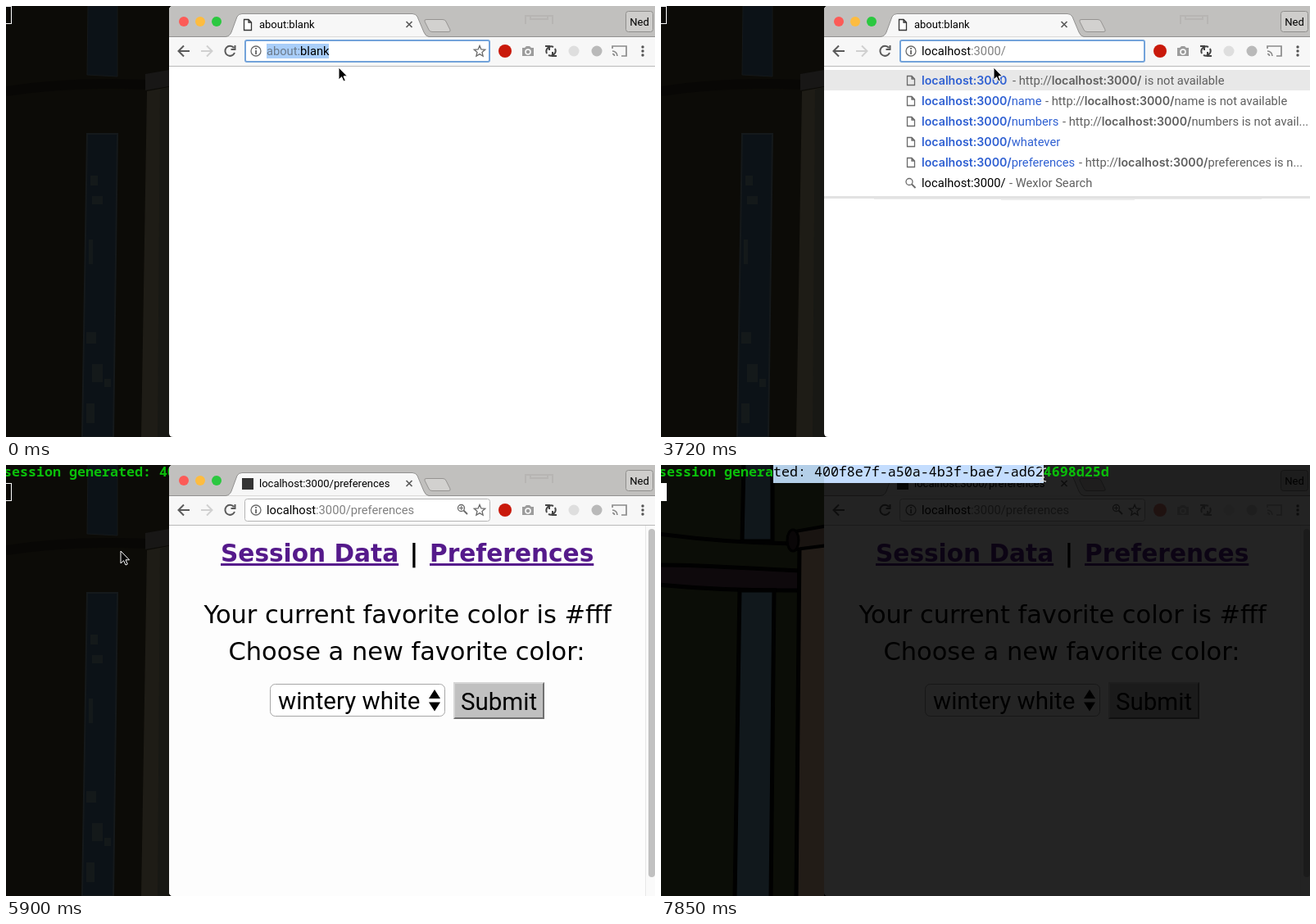
Write an HTML page that moves like this. It is 792x526 px and loops after 8000 ms.

```html
<!DOCTYPE html>
<html lang="en">
<head>
<meta charset="utf-8">
<title>Session demo</title>
<style>
  html, body { margin: 0; width: 100%; height: 100%; overflow: hidden; background: #0c0b07; }
  svg { display: block; width: 792px; height: 526px; }
  text { white-space: pre; font-family: Roboto, sans-serif; }
  .omni { font-size: 14.7px; }
  .strong { font: 600 14.2px Inter, sans-serif; }
  .tab { font-size: 13px; }
  .page { font: 30.45px "DejaVu Sans", sans-serif; text-anchor: middle; }
  .head { font: bold 29.6px "DejaVu Sans", sans-serif; }
  .link { text-decoration: underline; }
  .form { font-size: 29.5px; }
  .term { font: bold 16.67px "Noto Sans Mono", monospace; fill: #0abf0a; }
  #chosen { fill: #000; font-weight: 400; }
  .line { fill: none; stroke: #5a5a5a; stroke-width: 2; }
  .thin { fill: none; stroke: #6a6a6a; stroke-width: 1.3; }
</style>
</head>
<body>
<svg id="stage" viewBox="0 0 792 526"></svg>
<script>
const LOOP = 8000, ACTIVE = 6040;
const OUTPUT = 'session generated: 400f8e7f-a50a-4b3f-bae7-ad624698d25d';
const CELL = 10, TERM_X = -3, SEL_START = 14;

const rect = (x, y, w, h, fill, extra = '') =>
  `<rect x="${x}" y="${y}" width="${w}" height="${h}" fill="${fill}" ${extra}/>`;
const path = (d, attrs) => `<path d="${d}" ${attrs}/>`;
const text = (x, y, cls, body, fill = '#000') =>
  `<text x="${x}" y="${y}" class="${cls}" fill="${fill}">${body}</text>`;
const during = (from, to, body) => `<g data-from="${from}" data-to="${to}">${body}</g>`;
// Text between asterisks is bold.
const rich = s => s.split('*').map((part, i) =>
  i % 2 ? `<tspan class="strong">${part}</tspan>` : part).join('');

const sheet = (x, y, h, attrs = 'class="thin"') =>
  path(`M${x} ${y}h5.5l3.5 3.5v${h - 3.5}h-9zM${x + 5.5} ${y}v3.5h3.5`, attrs);
const star = (x, y, r) => {
  const points = Array.from({ length: 10 }, (_, i) => {
    const a = i * Math.PI / 5 - Math.PI / 2, k = i % 2 ? r * .45 : r;
    return `${(x + k * Math.cos(a)).toFixed(1)},${(y + k * Math.sin(a)).toFixed(1)}`;
  });
  return `<polygon points="${points.join(' ')}" class="thin"/>`;
};
const glass = (x, y) =>
  `<circle cx="${x - 1.5}" cy="${y - 1.5}" r="4" class="thin"/>` +
  path(`M${x + 1.5} ${y + 1.5}l4.5 4.5`, 'class="thin" style="stroke-width:1.8"');

function dimWallpaper() {
  return rect(0, 0, 792, 526, '#0c0b07') +
    path('M0 104Q80 92 170 96', 'fill="none" stroke="#080705" stroke-width="12"') +
    path('M100 0H136V86L99 84Z', 'fill="#0c1217" stroke="#15191b"') +
    path('M99 156H136L131 526H93Z', 'fill="#0c1217" stroke="#15191b" stroke-width="2"') +
    [[103, 207, 9, 12], [105, 232, 13, 10], [101, 285, 5, 30], [98, 398, 12, 14],
     [105, 437, 13, 22], [98, 485, 10, 24], [120, 455, 8, 10]]
      .map(([x, y, w, h]) => rect(x, y, w, h, '#14191a')).join('') +
    path('M172 104L199 99V526H165Z', 'fill="#1e1c16"') +
    path('M188 102L199 99V526H185Z', 'fill="#181814"') +
    path('M170 83L199 78V98L170 103Z', 'fill="#181716"');
}

function brightWallpaper() {
  const ink = 'stroke="#010101" stroke-width="5"';
  return '<clipPath id="desk"><path d="M0 0H199V526H0Z"/></clipPath><g clip-path="url(#desk)">' +
    rect(0, 0, 199, 526, '#0b0d07') +
    path('M101 -4H136V93H99Z', `fill="#10171b" ${ink}`) +
    path('M-4 84Q80 95 160 96', `fill="none" ${ink}`) +
    path('M-4 122C60 122 110 127 170 129V153Q80 154 -4 146Z', `fill="#0e090c" ${ink}`) +
    path('M96 153H138L134 530H90Z', `fill="#11181c" ${ink}`) +
    path('M169 100L204 97V530H165Z', `fill="#221c17" ${ink}`) +
    path('M164 81L204 74V98L164 103Z', 'fill="#191411" stroke="#010101" stroke-width="4"') +
    '<ellipse cx="161" cy="92" rx="7" ry="13" fill="#090607" stroke="#010101" stroke-width="3"/></g>';
}

function tabStrip() {
  const lights = ['#fc5b57', '#fdbc40', '#2bc840'].map((c, i) =>
    `<circle cx="${217 + 20 * i}" cy="19" r="6" fill="${c}"/>`).join('');
  return rect(199, 0, 593, 38, '#c1c0be') +
    path('M634 22V12H667V22M640 12V16H661V12', 'fill="none" stroke="#b7b5b3" stroke-width="2"') +
    during(ACTIVE, LOOP, rect(199, 0, 593, 38, '#e2e2e2')) +
    during(0, ACTIVE, lights) +
    path('M199 37.5H268Q273 37 275 32L282 13Q284 9.5 288 9.5H496Q500 9.5 502 13L510 32Q512 37 516 37.5H792',
      'fill="#f7f7f7" stroke="#929190"') +
    path('M513 16.5H533Q536 16.5 537 19L542 29Q543 31.5 540 31.5H520Q517 31.5 516 29L511 19Q510 16.5 513 16.5Z',
      'fill="#d2d1cf" stroke="#969492"') +
    path('M488.5 19l7 7m0-7l-7 7', 'class="line" style="stroke-width:1.7"') +
    rect(756.5, 6.5, 33, 25, '#cecdcb', 'rx="3" stroke="#8f8e8c"') +
    '<text x="773" y="24" class="tab" text-anchor="middle">Ned</text>' +
    during(0, 4580, sheet(290.5, 16.5, 13, 'fill="#fff" stroke="#333" stroke-width="1.3"')) +
    during(4580, 4720, path('M295 15.5A7 7 0 0 1 300 27', 'id="spinner" class="line" style="stroke:#9aa0a8"')) +
    during(4720, LOOP, rect(288, 16, 14, 14, '#333')) +
    during(0, 4670, text(309, 27, 'tab', 'about:blank')) +
    during(4670, LOOP, text(309, 27, 'tab', 'localhost:3000/preferences'));
}

function toolbar() {
  const reload = path('M278 51A6 6 0 1 0 279 57M279.5 48V53H274.5', 'class="line"');
  return rect(199, 38, 593, 36, '#f7f7f7') + rect(199, 73, 593, 1, '#b9b9b9') +
    path('M224 55H211M217 48.5L210.5 55L217 61.5', 'class="line"') +
    during(0, ACTIVE, path('M238 55H251M245 48.5L251.5 55L245 61.5', 'class="line" style="stroke:#d0d0d0"')) +
    during(0, 4580, reload) + during(4750, LOOP, reload) +
    during(4580, 4750, path('M267 49l12 12m0-12l-12 12', 'class="line"')) +
    during(0, 4580, rect(292, 42, 298, 26, '#fff', 'rx="2" stroke="#73a3da" stroke-width="2"')) +
    during(4580, LOOP, rect(291.5, 41.5, 299, 27, '#fff', 'rx="3" stroke="#b4b4b4"')) +
    '<circle cx="305" cy="55" r="6" class="thin"/>' +
    rect(304.2, 54, 1.7, 5, '#5a5a5a') + rect(304.2, 51, 1.7, 1.8, '#5a5a5a') +
    during(0, 900, star(578, 55.5, 7)) + during(4580, LOOP, star(578, 55.5, 7)) +
    during(4750, LOOP, glass(557, 54) + path('M553 52.5h5m-2.5-2.5v5', 'class="thin" style="stroke-width:1"')) +
    extensions() +
    during(ACTIVE, LOOP, rect(598, 42, 165, 27, '#f7f7f7', 'opacity=".45"'));
}

function extensions() {
  return '<circle cx="609" cy="55" r="8" fill="#c9190b"/>' +
    path('M630 51h3l2-2h4l2 2h3v10h-14z', 'fill="#9c9c9c"') +
    '<circle cx="637" cy="56" r="3" fill="#9c9c9c" stroke="#fff" stroke-width="1.5"/>' +
    path('M660 58A6 6 0 0 1 668 50M670 52A6 6 0 0 1 662 60M658 49h5v5M672 61h-5v-5', 'class="line" style="stroke:#444"') +
    '<circle cx="693" cy="55" r="6.5" fill="#dedede"/><circle cx="721" cy="55" r="6.5" fill="#b9b9b9"/>' +
    path('M740 52V49H757V61H751M740 55A6 6 0 0 1 746 61M740 58.5A2.5 2.5 0 0 1 742.5 61',
      'class="line" style="stroke:#8a8a8a;stroke-width:1.7"') +
    [50, 55, 60].map(y => `<circle cx="777" cy="${y}" r="1.7" fill="#555"/>`).join('');
}

function address(from, to, host, rest, selFrom, selTo) {
  const mark = selTo ? rect(selFrom, 46, selTo - selFrom, 18, '#a9cef9') : '';
  return during(from, to, mark + text(318, 60, 'omni', host + `<tspan fill="#808080">${rest}</tspan>`));
}
const caret = (from, to, x) => during(from, to, rect(x, 46, 1, 17, '#000'));

function addresses() {
  return during(0, 900, rect(318, 46, 76, 18, '#a9cef9') +
      text(318, 60, 'omni', '<tspan fill="#6c7b8c">about:</tspan>blank')) +
    address(900, 1040, 'localhost', ':3000', 321, 417) +
    address(1040, 1600, 'localhost', ':3000', 329, 417) +
    address(1600, 2080, 'localhost', ':3000') + caret(1600, 2080, 416) +
    address(2080, 4080, 'localhost', ':3000/') + caret(2080, 2620, 420) + caret(3180, 3720, 420) +
    address(4080, 4160, 'localhost', ':3000/preferences', 430, 498) +
    address(4160, 4580, 'localhost', ':3000/preferences', 436, 498) +
    address(4580, LOOP, 'localhost', ':3000/preferences');
}

// Each row: icon, link, x of the description, description.
function dropdown(from, to, rows) {
  const bottom = 82 + 25 * rows.length;
  const icons = {
    page: y => sheet(300.5, y - 5.5, 11),
    star: y => star(305, y, 6.5),
    find: y => glass(304.5, y)
  };
  const lines = rows.map(([icon, link, x, note], i) => {
    const y = 91 + 25 * i;
    return icons[icon](y) +
      text(318, y + 5, 'omni', rich(link), icon === 'find' ? '#000' : '#2f60d2') +
      (note ? text(x, y + 5, 'omni', rich('- ' + note), '#5f5f5f') : '');
  }).join('');
  return during(from, to, rect(199, 74, 593, bottom - 74, '#fff') + rect(199, 78, 593, 25, '#e8e8e8') + lines +
    rect(199, bottom, 593, 3, '#e2e2e2') + rect(260, bottom + 3, 473, 1, '#ececec') + rect(415, bottom + 4, 163, 1, '#ececec'));
}

const loRows = [
  ['page', '*lo*calhost:3000', 422, 'http://*lo*calhost:3000/ is not available'],
  ['page', '*lo*calhost:4000', 422, 'CSCI-UA.0480 Spring 2016, Section 010'],
  ['star', '*lo*calhost:4000/schedule.html', 517, 'CSCI-UA.0480 Spring 2016, Section 0...'],
  ['star', 'https://shibboleth.nyu.edu/idp/profile/*Lo*gout?execution=e...', 714, 'NYU *Lo*gin'],
  ['page', 'https://*lo*gin.nyu.edu/sso/UI/*Lo*gout', 552, 'NYU *Lo*gin'],
  ['find', 'lo*rem ipsum*', 406, 'Wexlor Search']
];
const lRows = loRows.map(row => row.map(v => String(v).replace(/\*(l)o\*/gi, '*$1*o')));
const hostRows = slash => {
  const host = slash ? '*localhost:3000/*' : '*localhost:3000*/';
  return [
    ['page', '*localhost:3000*', 429, `http://${host} is not available`],
    ['page', host + 'name', 469, `http://${host}name is not available`],
    ['page', host + 'numbers', 490, `http://${host}numbers is not avail...`],
    ['page', host + 'whatever'],
    ['page', host + 'preferences', 510, `http://${host}preferences is n...`],
    ['find', 'localhost:3000' + (slash ? '/' : ''), slash ? 425 : 421, 'Wexlor Search']
  ];
};
const prefRows = (typed, left) => [
  ['page', `*localhost:3000/${typed}*${left}`, 512, `http://*localhost:3000/${typed}*${left} is n...`],
  ['find', `localhost:3000/${typed}`, 438, 'Wexlor Search']
];

function page() {
  return rect(199, 74, 593, 452, '#fdfdfd') + rect(780, 74, 12, 452, '#fafafa') +
    rect(780, 74, 1, 452, '#e8e8e8') + rect(784, 78, 8, 425, '#c1c1c1', 'rx="4"') +
    text(262, 118, 'head link', 'Session Data', '#551a8b') + text(492.5, 118, 'head', '|') +
    text(517, 118, 'head link', 'Preferences', '#551a8b') +
    text(490, 193, 'page', 'Your current favorite color is #fff') +
    text(489, 238, 'page', 'Choose a new favorite color:') +
    rect(322.5, 267.5, 213, 39, '#fff', 'rx="6" stroke="#a6a6a6"') +
    text(332, 298, 'form', 'wintery white') +
    path('M516 285L523 274L530 285ZM516 289.5L523 300.5L530 289.5Z', '') +
    rect(546, 265, 111, 45, '#c0c0c0') +
    path('M546 310V265H657L655 267H548V308Z', 'fill="#d6d6d6"') +
    path('M546 310H657V265L655 267V308H548Z', 'fill="#707070"') +
    text(555, 299, 'form', 'Submit');
}

function browser() {
  return '<clipPath id="window"><path d="M204 0H792V526H204Q199 526 199 521V5Q199 0 204 0Z"/></clipPath>' +
    '<g clip-path="url(#window)">' + rect(199, 0, 593, 526, '#fff') + tabStrip() + toolbar() + addresses() +
    dropdown(900, 1040, lRows) + dropdown(1040, 1630, loRows) +
    dropdown(1630, 2080, hostRows(false)) + dropdown(2080, 4080, hostRows(true)) +
    dropdown(4080, 4160, prefRows('p', 'references')) + dropdown(4160, 4580, prefRows('pr', 'eferences')) +
    during(4580, 4700, rect(199, 74, 593, 64, '#fafafa')) +
    during(4700, LOOP, page()) + '</g>';
}

function terminal() {
  const box = y => rect(-.5, y + .5, 7, 21, 'none', 'stroke="#fff"');
  return during(0, 4640, box(0)) +
    during(4640, ACTIVE, box(22) + text(TERM_X, 14, 'term', OUTPUT));
}

function activeTerminal() {
  return during(ACTIVE, LOOP, rect(199, 0, 593, 526, '#000', 'opacity=".86"') + brightWallpaper() +
    rect(137, 0, 0, 22, '#c4ddfe', 'id="mark"') + rect(137, 0, 0, 22, '#b4cfe8', 'id="markLeft"') +
    text(TERM_X, 14, 'term', '<tspan id="before"></tspan><tspan id="chosen"></tspan><tspan id="after"></tspan>') +
    rect(0, 22, 7, 22, '#fff'));
}

const pointer = '<g id="pointer">' +
  during(0, ACTIVE, path('M0 0V15L3.6 11.7L6 17L8.3 16L6 10.8H10.5Z', 'fill="#000" stroke="#fff"')) +
  during(ACTIVE, LOOP, path('M-4 -8Q0 -8 0 -5Q0 -8 4 -8M0 -5V5M-4 8Q0 8 0 5Q0 8 4 8M-2 3H2',
    'fill="none" stroke="#ddd" stroke-width="1.3"')) + '</g>';

document.getElementById('stage').innerHTML =
  dimWallpaper() + terminal() + browser() + activeTerminal() + pointer;

const byId = id => document.getElementById(id);
const timed = [...document.querySelectorAll('[data-from]')].map(node =>
  ({ node, from: +node.dataset.from, to: +node.dataset.to }));

// Pointer track: time, x, y.
const track = [
  [0, 406, 75], [5530, 406, 75], [5610, 385, 79], [5720, 290, 95], [5840, 165, 107], [5900, 140, 105],
  [5960, 140, 105], [6080, 146, 106], [6260, 146, 106], [6500, 156, 85], [6760, 148, 45], [6980, 141, 21],
  [7100, 141, 21], [7290, 234, 23], [7560, 365, 24], [7850, 466, 12], [LOOP, 466, 12]
];
function pointerAt(t) {
  const i = Math.max(1, track.findIndex(k => k[0] >= t));
  const [t0, x0, y0] = track[i - 1], [t1, x1, y1] = track[i];
  const k = (t - t0) / (t1 - t0);
  return [x0 + (x1 - x0) * k, y0 + (y1 - y0) * k];
}

function select(t) {
  // The highlight trails the pointer slightly and settles at the end.
  const x = pointerAt(t >= 7850 ? t : t - 30)[0];
  const end = t < 7130 ? SEL_START : Math.max(SEL_START, Math.round((x - TERM_X) / CELL));
  const width = (end - SEL_START) * CELL;
  byId('before').textContent = OUTPUT.slice(0, SEL_START);
  byId('chosen').textContent = OUTPUT.slice(SEL_START, end);
  byId('after').textContent = OUTPUT.slice(end);
  byId('mark').setAttribute('width', width);
  byId('markLeft').setAttribute('width', Math.min(width, 62));
}

function render(t) {
  for (const { node, from, to } of timed) node.style.display = t >= from && t < to ? '' : 'none';
  byId('pointer').setAttribute('transform', `translate(${pointerAt(t).map(Math.round)})`);
  byId('spinner').setAttribute('transform', `rotate(${Math.floor((t - 4580) / 30) * 30} 295 22.5)`);
  if (t >= ACTIVE) select(t);
}

const start = performance.now();
function tick() {
  render((performance.now() - start) % LOOP);
  requestAnimationFrame(tick);
}
tick();
</script>
</body>
</html>
```
